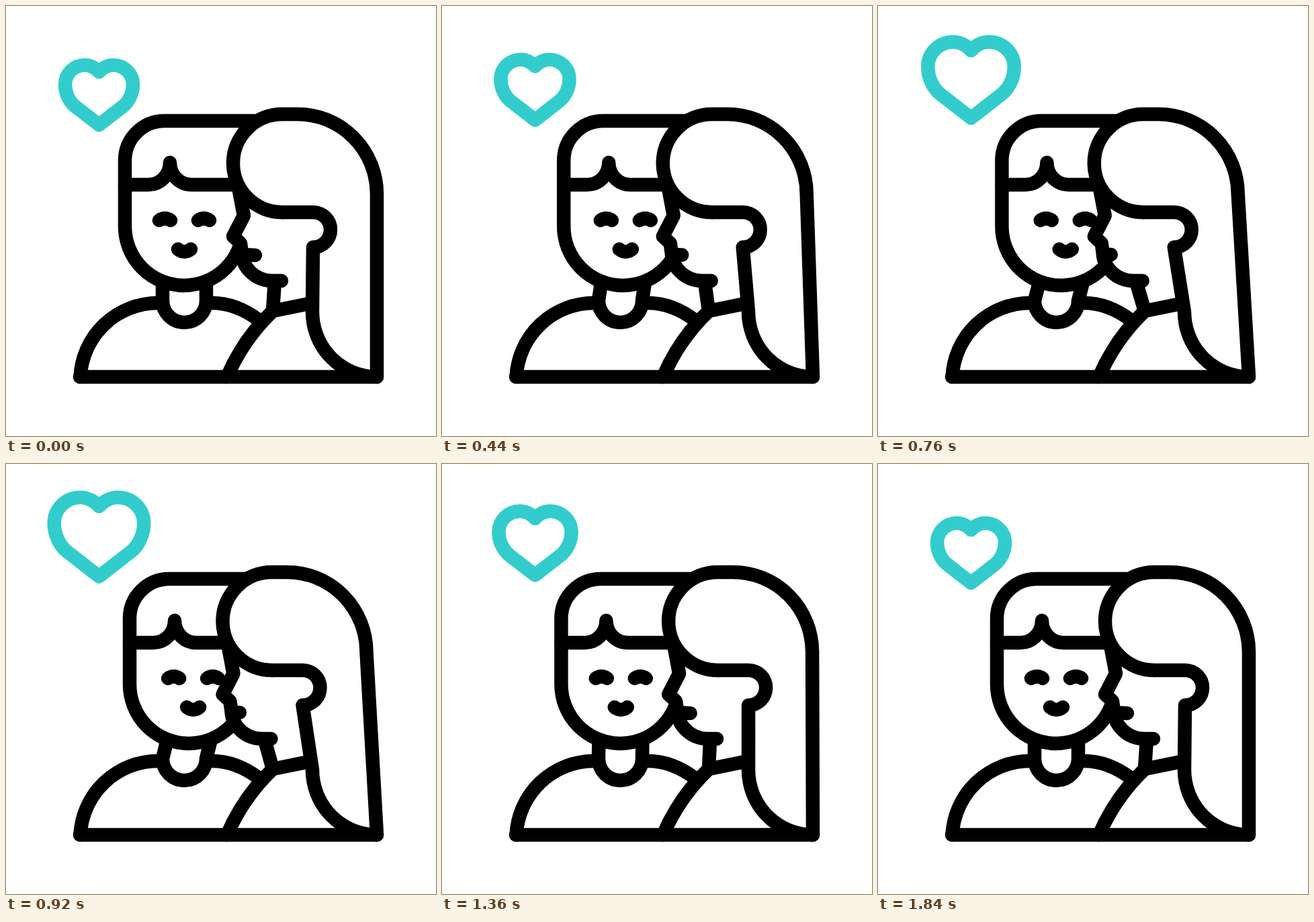
These frames come from a looping animation (640 by 640 pixels, 2 s). An HTML page:

```html
<!DOCTYPE html>
<html lang="en">
<head>
<meta charset="utf-8">
<title>Kiss on the cheek</title>
<style>
  html, body { margin: 0; height: 100%; overflow: hidden; background: #fff; }
  svg { display: block; width: 100vw; height: 100vh; }
</style>
</head>
<body>
<svg viewBox="0 0 640 640" fill="none" stroke="#000" stroke-width="20.5" stroke-linecap="round" stroke-linejoin="round">
  <path id="manNeck"/>
  <path d="M110.500 552A116 116 0 0 1 226 442M306 442C333 442 356 452 377 468"/>
  <g id="man">
    <path fill="#fff" d="M370 171H236A59 59 0 0 0 177 230V328A88 88 0 0 0 353 328"/>
    <path d="M177 266H212A32 33 0 0 0 244 233A32 33 0 0 0 276 266H340"/>
  </g>
  <path id="features" d="M228 319q8.500-5.500 17 0M286 319q8.500-5.500 17 0M256 362q9.500 7.500 19 0"/>
  <path id="womanNeck"/>
  <path d="M329 552Q353 496 397 454L456 442"/>
  <g id="woman">
    <path fill="#fff" d="M440 300L411 307L347 275L354 312L338 343L349 353L351 368C352 390 372 409 396 409H410"/>
    <path id="mouth"/>
  </g>
  <path id="hair" fill="#fff"/>
  <path d="M110 552H552"/>
  <path id="heart" stroke="#33cccc"/>
</svg>
<script>
const LOOP = 2000;
const $ = id => document.getElementById(id);
const draw = (id, d) => $(id).setAttribute('d', d);
const shift = (id, x) => $(id).setAttribute('transform', `translate(${x})`);

// Cubic bezier easing (.6, 0, .4, 1)
function ease(u) {
  if (u <= 0) return 0;
  if (u >= 1) return 1;
  let lo = 0, hi = 1, s;
  for (let i = 0; i < 20; i++) {
    s = (lo + hi) / 2;
    const r = 1 - s;
    if (1.8 * s * r * r + 1.2 * s * s * r + s ** 3 < u) lo = s; else hi = s;
  }
  return s * s * (3 - 2 * s);
}

// Rises from a to b, returns to zero from c to d
const pulse = (t, a, b, c, d) => ease((t - a) / (b - a)) - ease((t - c) / (d - c));

function heartPath(cy, k) {
  const pt = (x, y) => `${138.5 + x * k} ${cy + y * k} `;
  const half = m => 'M' + pt(0, -34.5)
    + 'C' + pt(-6 * m, -41) + pt(-14 * m, -44.5) + pt(-21 * m, -44.5)
    + 'C' + pt(-37.5 * m, -44.5) + pt(-50.5 * m, -31.5) + pt(-50.5 * m, -15.5)
    + 'C' + pt(-50.5 * m, -2) + pt(-44 * m, 10) + pt(-36 * m, 16.5)
    + 'L' + pt(0, 44.5);
  return half(1) + half(-1);
}

function render(t) {
  const lean = pulse(t, 40, 800, 770, 1520);
  const man = 7.4 * lean, woman = -16.3 * lean;

  shift('man', man);
  shift('features', 13.8 * lean);
  draw('manNeck', `M${233 + man} 410L233 438.500A32.500 32.500 0 0 0 298 438.500L${298 + man} 410`);

  shift('woman', woman);
  draw('womanNeck', `M${400 + woman} 409L397 454`);
  draw('mouth', `M352 370L${371 - 8 * lean} ${371 - lean}`);
  draw('hair', `M${457 + woman} 359a26 26 0 0 0 0-52h-46a73 73 0 0 1 0-146h23`
    + `a118 119 0 0 1 118 119L552 552A96 97 0 0 1 456 455Z`);

  const lift = pulse(t, 40, 980, 980, 1820);
  const grow = pulse(t, 325, 975, 950, 1600);
  draw('heart', heartPath(132.5 - 24 * lift, 1 + 0.325 * grow));
}

const start = performance.now();
function tick() {
  render((performance.now() - start) % LOOP);
  requestAnimationFrame(tick);
}
tick();
</script>
</body>
</html>
```
